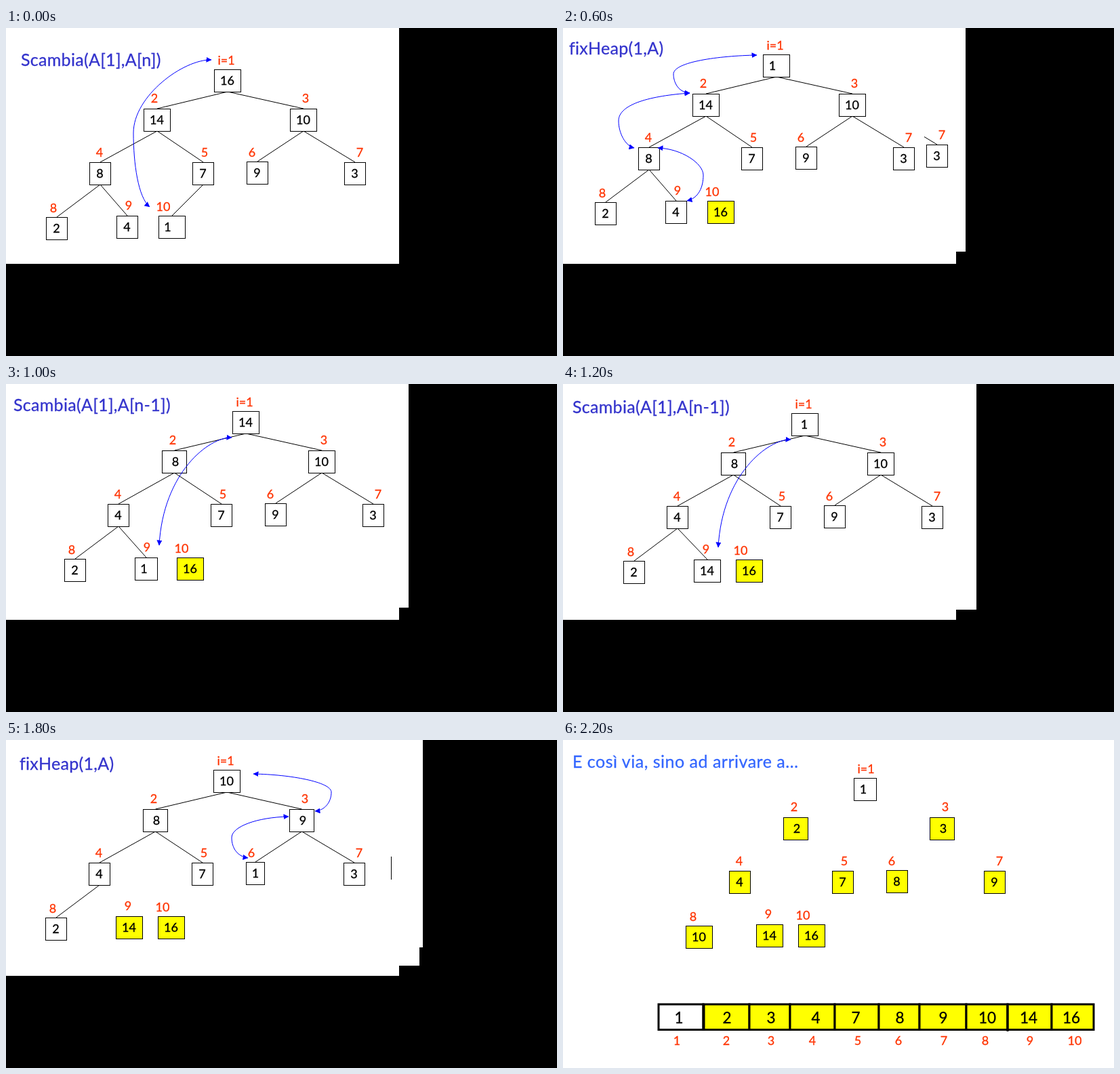
Animation, 813 px wide and 484 px high, one loop 2.4 s. Source, as an HTML page:

```html
<!DOCTYPE html>
<html lang="it">
<head>
<meta charset="utf-8">
<title>Heapsort</title>
<style>
  html, body { margin: 0; width: 100%; height: 100%; overflow: hidden; background: #000; }
  svg { display: block; }
  text { font: 18px "Comic Sans MS", Lato, sans-serif; text-anchor: middle; stroke-width: .3px; fill: #000; stroke: #000; }
  .label { fill: #f30; stroke: #f30; }
  .title { font-size: 25px; text-anchor: start; letter-spacing: .3px; fill: #33c; stroke: #33c; }
  .title.end { letter-spacing: .5px; fill: #36f; stroke: #36f; }
  .cell { font-size: 22.5px; }
  .box, .edge { stroke: #000; fill: #fff; }
  .done { fill: #ff0; }
  .arrow { fill: none; stroke: #00f; }
  .bar { stroke: #000; stroke-width: 3; }
</style>
</head>
<body>
<svg id="stage" width="813" height="484" viewBox="0 0 813 484">
  <defs>
    <marker id="tip" viewBox="0 0 8 8" refX="7.5" refY="4" markerWidth="8" markerHeight="8"
            markerUnits="userSpaceOnUse" orient="auto-start-reverse">
      <path d="M0 0L8 4L0 8Z" fill="#00f"/>
    </marker>
  </defs>
</svg>
<script>
const STEP = 200;

// Node slots: box x, box y, label x, label y
const slots = [
  [307, 61, 325, 47], [203, 119, 219, 103], [419, 119, 442, 103],
  [123, 198, 138, 183], [275, 198, 293, 183], [355, 197, 363, 183], [499, 198, 522, 183],
  [59, 279, 70, 265], [163, 277, 181, 261], [225, 277, 232, 263]
];

// A value is a number, or [number, box width, text offset]
const eight = [8, 37, 20], nine = [9, 37, 20], top1 = [1, 40, 14], mid1 = [1, 40, 19];
const full     = [16, 14, 10, 8, 7, 9, 3, 2, 4, [1, 40, 13.5]];
const swapped  = [top1, 14, 10, 8, 7, 9, 3, 2, 4, 16];
const fixed    = [14, eight, 10, 4, 7, 9, 3, 2, [1, 34, 13.5], 16];
const swapped2 = [mid1, eight, 10, 4, 7, 9, 3, 2, 14, 16];
const fixed2   = [10, eight, nine, 4, 7, [1, 28, 14], 3, 2, 14, 16];
const sorted   = [[1, 34, 14], [2, 37, 20], [3, 37, 20], 4, 7, 8, 9, 10, 14, 16];

const swapA = ["M303 47C262 46 188 100 188 155C188 200 195 250 212 264"];
const swapB = ["M306 100C273 99 205 151 199 259"];
const sinkA = [
  "M298 62C242 63 175 72 175 90C175 102 182 117 199 118",
  "M199 118C142 122 94 134 94 159C94 177 104 196 117 199",
  "M152 199C187 200 219 222 219 239C219 257 212 273 195 277"
];
const sinkB = [
  "M366 67C421 68 481 79 481 94C481 109 471 121 457 122",
  "M418 130C371 131 334 145 334 161C334 177 343 189 358 191"
];

const swapText = "Scambia(A[1],A[n])", swapText2 = "Scambia(A[1],A[n-1])";
const sizeText = "heapsize = heapsize -1", fixText = "fixHeap(1,A)";
const endText = "E così via, sino ad arrivare a…";

// page size, title, title position, tree shift, values, heap size, arrows
const scenes = [
  [580, 348, swapText, 22, 47, 0, 0, full, 10, swapA],
  [594, 330, swapText, 12, 32, -10, -15, swapped, 10, swapA],
  [594, 330, sizeText, 13, 33, 37, -26, swapped, 9, []],
  [533, 330, fixText, 9, 30, -12, -22, swapped, 9, sinkA],
  [538, 330, fixText, 12, 32, -9, -20, fixed, 9, sinkA],
  [594, 330, swapText2, 11, 31, 27, -21, fixed, 9, swapB],
  [610, 333, swapText2, 14, 34, 30, -18, swapped2, 9, swapB],
  [615, 306, sizeText, 14, 33, 38, -26, swapped2, 8, []],
  [568, 306, fixText, 22, 39, 1, -13, swapped2, 8, sinkB],
  [568, 306, fixText, 20, 35, -1, -17, fixed2, 8, sinkB],
  [693, 340, endText, 9, 27, 117, -10, fixed2, 8, []],
  [813, 484, endText, 14, 32, 122, -5, sorted, 1, []]
];

const text = (s, x, y, cls = "") => `<text class="${cls}" x="${x}" y="${y}">${s}</text>`;
const rect = (x, y, w, h, cls) => `<rect class="${cls}" x="${x}" y="${y}" width="${w}" height="${h}"/>`;
const line = (x1, y1, x2, y2, cls) => `<path class="${cls}" d="M${x1} ${y1}L${x2} ${y2}"/>`;

function tree(values, size, arrows) {
  const nodes = values.map((v, i) => {
    const [n, w = v > 9 ? 40 : 32, dx = w / 2 - .5] = [].concat(v);
    const [x, y, lx, ly] = slots[i];
    return { n, w, dx, x, y, lx, ly, cx: x + w / 2 };
  });
  let out = "";
  nodes.forEach((k, i) => {
    if (!i || i >= size) return;
    const p = nodes[(i - 1) >> 1];
    out += line(p.cx, p.y + 33, k.cx, k.y, "edge");
  });
  nodes.forEach((k, i) => {
    out += rect(k.x + .5, k.y + .5, k.w - 1, 33, i < size ? "box" : "box done")
      + text(k.n, k.x + k.dx, k.y + 22.5)
      + text(i ? i + 1 : "i=1", k.lx, k.ly + 6.5, "label");
  });
  for (const d of arrows)
    out += `<path class="arrow" d="${d}" marker-start="url(#tip)" marker-end="url(#tip)"/>`;
  return out;
}

function arrayBar() {
  const edges = [141, 207, 275, 335, 401, 466, 526, 595, 656, 721, 783];
  const valueX = [171, 242, 307, 373, 432, 497, 561, 626, 687, 750];
  const indexX = [168, 241, 307, 368, 435, 495, 562, 623, 689, 755];
  let out = "";
  sorted.forEach((v, i) => {
    const x = edges[i];
    out += rect(x, 390, edges[i + 1] - x, 37.5, i ? "bar done" : "bar box")
      + text([].concat(v)[0], valueX[i], 417.5, "cell")
      + text(i + 1, indexX[i], 449.5, "label");
  });
  return out + line(208, 389, 208, 429, "bar") + line(656, 392, 656, 430, "bar");
}

// Each page covers only its own area, so older pages show around it
const stage = document.getElementById("stage");
stage.insertAdjacentHTML("beforeend", scenes.map(([w, h, title, x, y, dx, dy, values, size, arrows], i) =>
  `<svg class="page" width="${w}" height="${h}" overflow="hidden">
    <rect width="${w}" height="${h}" fill="#fff"/>
    ${text(title, x, y + 8.5, title === endText ? "title end" : "title")}
    <g transform="translate(${dx} ${dy})">${tree(values, size, arrows)}</g>
    ${i === scenes.length - 1 ? arrayBar() : ""}
  </svg>`).join(""));

const pages = [...stage.querySelectorAll(".page")];
const start = performance.now();
function draw() {
  const now = Math.floor((performance.now() - start) / STEP) % scenes.length;
  pages.forEach((p, i) => { p.style.display = i <= now ? "" : "none"; });
  requestAnimationFrame(draw);
}
draw();
</script>
</body>
</html>
```
